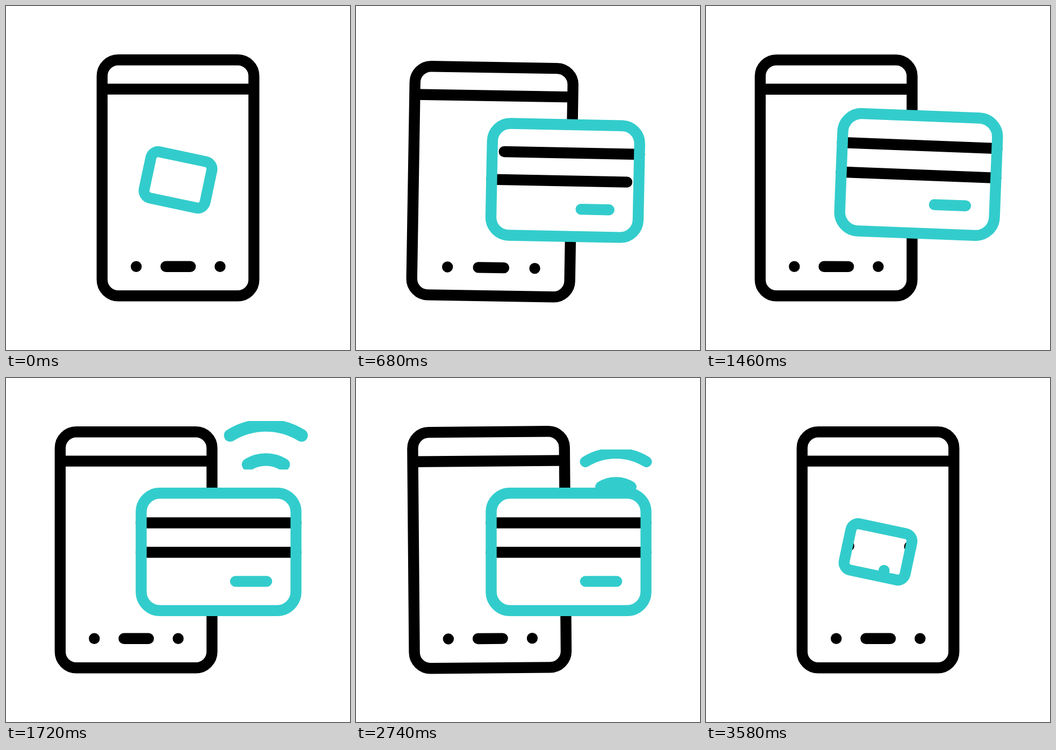
Write an HTML page with a canvas that moves like this. It is 640 px wide and 640 px high and loops after 3600 ms.

```html
<!DOCTYPE html>
<html lang="en">
<head>
<meta charset="utf-8">
<title>Mobile payment</title>
<style>
  html, body { margin: 0; width: 100%; height: 100%; overflow: hidden; background: #fff; }
  canvas { display: block; width: 640px; height: 640px; }
</style>
</head>
<body>
<canvas id="stage" width="640" height="640"></canvas>
<script>
const ctx = document.getElementById('stage').getContext('2d');
const LOOP = 3600, STEP = 20;
const BLACK = '#000', TEAL = '#33cccc', STROKE = 20.4;

const rad = deg => deg * Math.PI / 180;
const span = (t, from, to) => Math.min(1, Math.max(0, (t - from) / (to - from)));

// 0 to 1: a larger `slowIn` delays the start, a larger `slowOut` softens the end.
const ease = (t, from, to, slowIn, slowOut) =>
  1 - (1 - span(t, from, to) ** slowIn) ** slowOut;

// 0 to 1 and back to 0.
const hump = (t, from, to) => Math.sin(Math.PI * span(t, from, to)) ** 3;

// Quick rise to 1 at `peak`, then a long decay.
function recoil(t, from, peak) {
  const x = Math.max(0, (t - from) / (peak - from));
  return (x * Math.exp(1 - x)) ** 3;
}

const lean = t => recoil(t, 60, 400);
const cardGrowth = (t, end) => ease(t, 60, 1020, 1.3, 3) - ease(t, 2600, end, 5.5, 1.7);

// Strokes keep their weight; only the coordinates passed in are scaled.
function line(color, x0, y0, x1, y1, cap = 'round') {
  ctx.strokeStyle = color;
  ctx.lineCap = cap;
  ctx.beginPath();
  ctx.moveTo(x0, y0);
  ctx.lineTo(x1 + 0.01, y1);
  ctx.stroke();
}

function frame(x, y, w, h, r) {
  ctx.beginPath();
  ctx.roundRect(x, y, w, h, r);
}

function pose(x, y, deg, draw) {
  ctx.save();
  ctx.translate(x, y);
  ctx.rotate(rad(deg));
  ctx.lineWidth = STROKE;
  draw();
  ctx.restore();
}

function drawPhone(t) {
  const shift = ease(t, 60, 800, 3.2, 6.5) - ease(t, 2560, 3400, 1.9, 2);
  const x = 320 - 78 * shift + 15 * lean(t);
  const tilt = 1.85 * lean(t) - 2 * hump(t, 2560, 3400);
  const sx = 1 + 0.08 * lean(t), sy = 1 - 0.059 * lean(t);
  pose(x, 549.5, tilt, () => {
    const half = 141.2 * sx, bottom = -10.2;
    const top = -459.5 * sy + 10.2;
    const header = top + 54.4 * sy, buttons = -64.7 * sy;
    frame(-half, top, 2 * half, bottom - top, 30);
    ctx.strokeStyle = BLACK;
    ctx.stroke();
    line(BLACK, -half, header, half, header, 'butt');
    for (const dot of [-77.7, 78.3]) line(BLACK, dot * sx, buttons, dot * sx, buttons);
    line(BLACK, -22.5 * sx, buttons, 23 * sx, buttons);
  });
}

function drawWaves(t) {
  const hidden = 1 - ease(t, 1460, 1640, 1, 2) + ease(t, 2560, 2940, 2, 1.6);
  if (hidden >= 1) return;
  pose(483.5, 170 + 120 * hidden, 0, () => {
    const s = 1 - 0.06 * hidden ** 2 + 0.22 * hump(t, 1500, 1840);
    ctx.scale(s, s);
    ctx.beginPath();
    ctx.rect(-80, -77.7, 160, 78);
    ctx.clip();
    ctx.strokeStyle = TEAL;
    ctx.lineCap = 'round';
    for (const r of [109.5, 54.5]) {
      ctx.beginPath();
      ctx.arc(0, 38.7, r, rad(-121.5), rad(-58.5));
      ctx.stroke();
    }
  });
}

function drawCard(t) {
  const p = cardGrowth(t, 3580), ink = cardGrowth(t, 3600);
  const s = 0.402 + 0.598 * p;
  const hop = hump(t, 1180, 1740);
  const y = 323.5 + 25.8 * lean(t) * (1 - p) - 10 * hop;
  const tilt = 12 * (1 - p) * (1 + 0.33 * lean(t)) + 2.2 * hop;
  pose(320 + 75.5 * p, y, tilt, () => {
    const w = 288 * s, h = 218.6 * s, edge = w / 2;
    frame(-edge, -h / 2, w, h, 35 * s);
    ctx.fillStyle = '#fff';
    ctx.fill();
    if (ink > 0) {
      line(BLACK, edge, -54 * s, edge - w * ink, -54 * s);
      line(BLACK, -edge, 0.8 * s, -edge + w * ink, 0.8 * s);
      const px = 18 + 13.5 * p, py = 31.5 + 23.4 * p;
      line(TEAL, px, py, px + 58 * ink ** 1.3, py);
    }
    frame(-edge, -h / 2, w, h, 35 * s);
    ctx.strokeStyle = TEAL;
    ctx.stroke();
  });
}

const start = performance.now();
function render(now) {
  const elapsed = Math.max(0, now - start) % LOOP;
  const t = Math.floor(elapsed / STEP) * STEP;
  ctx.fillStyle = '#fff';
  ctx.fillRect(0, 0, 640, 640);
  drawPhone(t);
  drawWaves(t);
  drawCard(t);
  requestAnimationFrame(render);
}
render(start);
</script>
</body>
</html>
```
